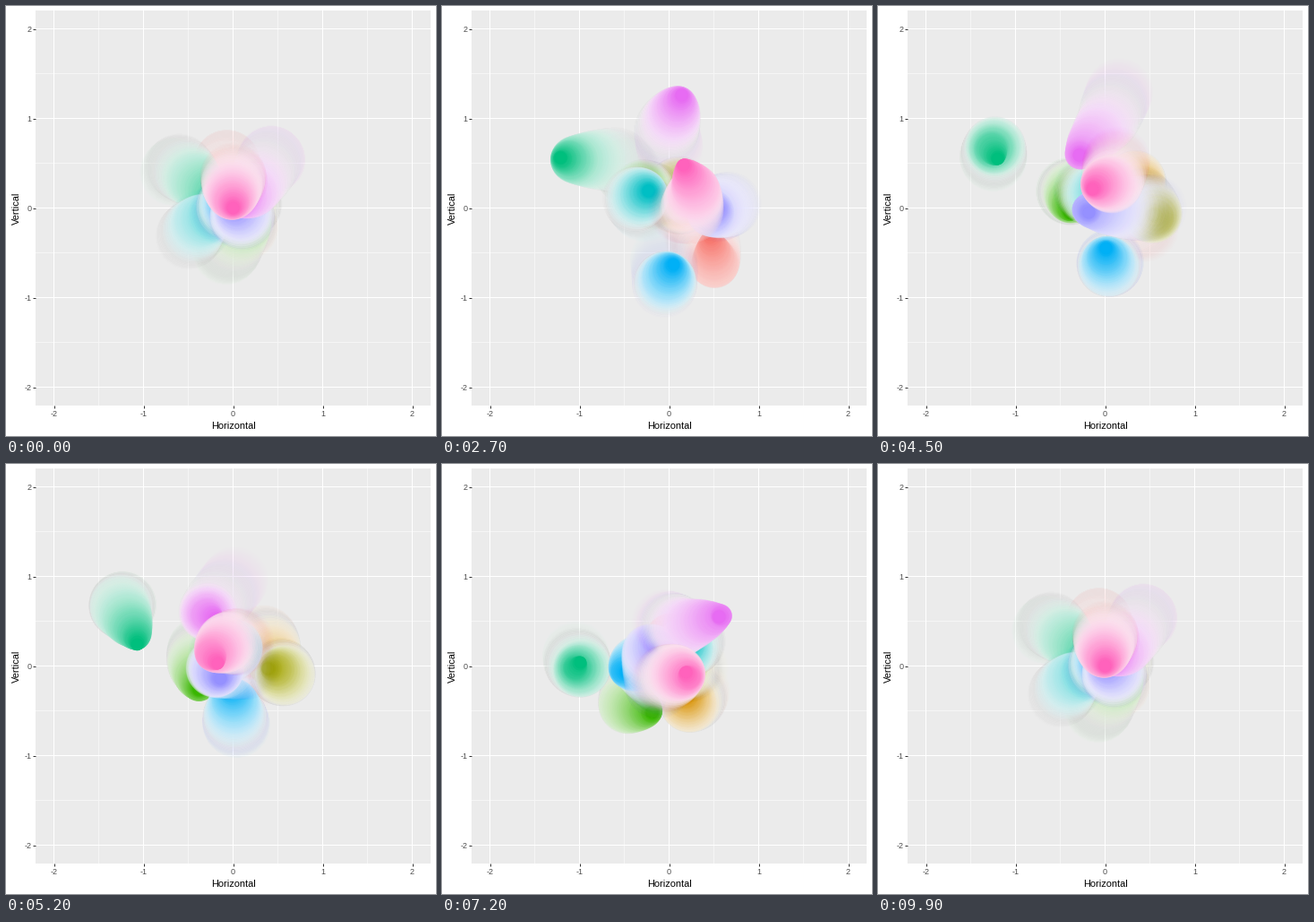
These frames come from a looping animation (480x480 px, 10000 ms). A matplotlib script:

```python
import numpy as np
import matplotlib.pyplot as plt
from matplotlib.animation import FuncAnimation

SIZE, DPI = 480, 100
FRAMES, INTERVAL = 100, 100
CX, CY, UNIT, HALF = 253, 225, 100, 220   # panel centre, pixels per unit
LOOP, STEPS = 99, 14                      # frames and moves of one closed walk
WAKE, DETAIL = 20, 4                      # wake length in frames, discs per frame
HEAD_R, TAIL_R, KICK = 6.8, 37.5, .07

rng = np.random.default_rng(7)


def walk(points):
    """Closed walk from the origin past evenly spaced points, with random turns."""
    stops = np.array([(0, 0), *points, (0, 0)], float)
    steps = np.arange(STEPS + 1)
    at = np.linspace(0, STEPS, len(stops))
    t = np.arange(LOOP * DETAIL) * STEPS / (LOOP * DETAIL)
    kick = rng.normal(0, KICK, (2, STEPS + 1)) * (steps % 2)
    x, y = (np.interp(t, steps, np.interp(steps, at, stops[:, i]) + kick[i])
            for i in (0, 1))
    return np.rint(np.stack([CX + UNIT * x, CY - UNIT * y], axis=1)).astype(int)


def wake(color):
    """Discs from tail to head: growing, whitening and fading out with age."""
    rgb = np.array([int(color[i:i + 2], 16) for i in (1, 3, 5)])[:, None, None]
    discs = []
    for age in range(WAKE * DETAIL - 1, -1, -1):
        fade = (1 - age / (WAKE * DETAIL)) ** 3
        if round(255 * fade) == 0:
            continue
        r = TAIL_R + (HEAD_R - TAIL_R) * fade
        half = int(r) + 1
        d = np.arange(-half, half + 1)
        edge = np.clip(r + .5 - np.hypot(d, d[:, None]), 0, 1)
        a = np.rint(255 * fade * edge)
        paint = np.floor(np.rint(255 + (rgb - 255) * fade) * a / 255)
        discs.append((age, half, paint.astype(np.float32),
                      (1 - a / 255).astype(np.float32)))
    return discs


# later walks lie on top of earlier ones
walks = [(walk(points), wake(color)) for color, points in {
    "#F8766D": [(.6, -.55), (.25, .2), (.1, .1), (-.1, .7)],
    "#D89000": [(.2, .1), (.45, .3), (.25, -.45), (.15, -.25)],
    "#A3A500": [(.15, .3), (.65, -.12), (.15, 0), (.25, .05)],
    "#39B600": [(-.4, .25), (-.4, .1), (-.4, -.4), (-.05, -.6)],
    "#00BF7D": [(-.58, .54), (-1.25, .56), (-1.26, .66), (-1.03, .05), (-1.04, -.02), (-.6, .46)],
    "#00BFC4": [(-.38, .1), (-.21, .2), (0, .2), (.26, .28), (.2, .25), (-.5, -.32)],
    "#00B0F6": [(-.05, -.86), (.06, -.6), (.01, -.53), (-.1, -.15), (-.52, -.06), (-.05, 0)],
    "#9590FF": [(.67, .04), (.55, 0), (-.2, -.02), (-.12, -.22), (-.1, .25), (.1, -.1)],
    "#E76BF3": [(-.03, .87), (.16, 1.3), (-.28, .6), (0, .46), (.58, .56), (.42, .55)],
    "#FF62BC": [(.25, -.03), (.13, .54), (-.08, .26), (-.04, -.14), (.22, -.12), (0, .36)],
}.items()]


def panel():
    img = np.full((3, SIZE, SIZE), 255, np.float32)
    view = img[:, CY - HALF:CY + HALF + 1, CX - HALF:CX + HALF + 1]
    view[:] = 235
    for first, tone in ((HALF - 150, 245), (HALF - 200, 255)):
        lines = slice(first, None, UNIT)
        view[:, lines] = np.maximum(view[:, lines], tone)
        view[:, :, lines] = np.maximum(view[:, :, lines], tone)
    return img


def to_image(img):
    return img.transpose(1, 2, 0).astype(np.uint8)


def render(frame):
    img = base.copy()
    for path, discs in walks:
        for age, half, paint, keep in discs:
            x, y = path[(frame * DETAIL - age) % len(path)]
            part = img[:, y - half:y + half + 1, x - half:x + half + 1]
            # whole 8-bit steps, rounded down, leave the old tails slightly grey
            part *= keep
            np.floor(part, out=part)
            part += paint
    return to_image(img)


def label(x, y, text, px, **style):
    ax.text(x, y, text, fontsize=px * 72 / DPI, family="Liberation Sans", **style)


base = panel()
fig = plt.figure(figsize=(SIZE / DPI, SIZE / DPI), dpi=DPI, facecolor="white")
ax = fig.add_axes([0, 0, 1, 1])
ax.axis("off")
stage = ax.imshow(to_image(base), extent=(0, SIZE, SIZE, 0),
                  interpolation="nearest", aspect="auto")
ax.set_xlim(0, SIZE)
ax.set_ylim(SIZE, 0)

tick = dict(color="#333333", lw=72 / DPI, solid_capstyle="butt")
tone = dict(color="#4D4D4D", va="center_baseline")
for v in range(-2, 3):
    x, y = CX + UNIT * v + .5, CY - UNIT * v + .5
    ax.plot([x, x], [446, 449], **tick)
    ax.plot([30, 33], [y, y], **tick)
    label(x, 454.5, str(v), 9, ha="center", **tone)
    label(28.5, y, str(v), 9, ha="right", **tone)
label(253.5, 472, "Horizontal", 11, ha="center", va="baseline", color="black")
label(11.5, 225.5, "Vertical", 11, ha="center", va="center", rotation=90, color="black")


def update(frame):
    stage.set_data(render(frame))
    return [stage]


anim = FuncAnimation(fig, update, frames=FRAMES, interval=INTERVAL,
                     repeat=True, repeat_delay=0)
plt.show()
```
